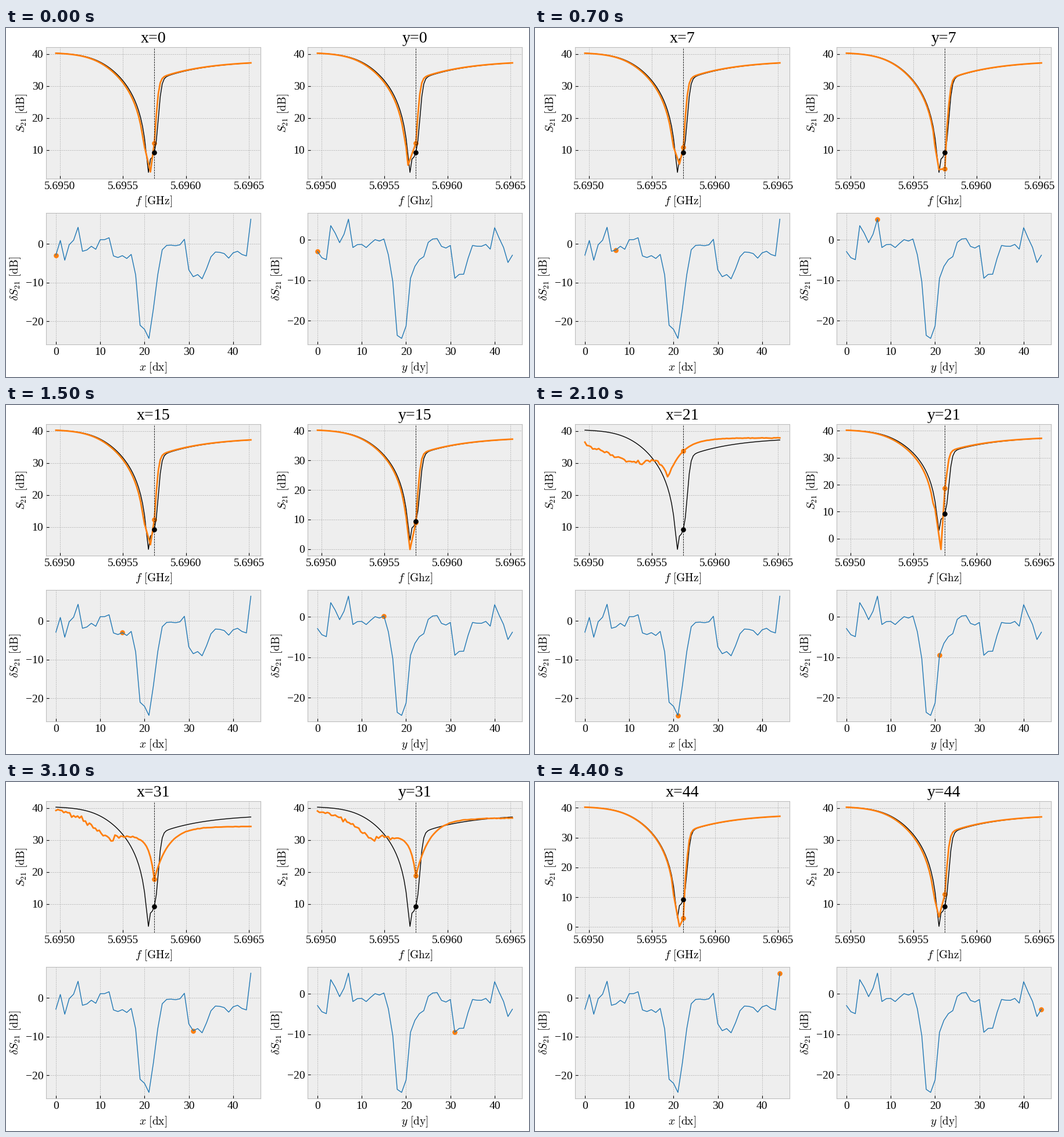
Animation, 900 px wide and 600 px high, one loop 4500 ms. Source, as a matplotlib script:

```python
import numpy as np
import matplotlib.pyplot as plt
from matplotlib.animation import FuncAnimation
from matplotlib.ticker import MultipleLocator

W, H, DPI = 900, 600, 100
STEPS = 45
N, MID, NOTCH = 100, 50, 47
ORANGE, BLUE = "#ff7f0e", "#1f77b4"

plt.rcParams.update({
    "font.family": "Liberation Serif", "font.size": 14,
    "mathtext.fontset": "cm",
    "axes.facecolor": "#eeeeee", "axes.edgecolor": "#bcbcbc",
    "axes.titlesize": 20.16, "axes.labelsize": 14,
    "axes.grid": True, "axes.axisbelow": True,
    "grid.color": "#b2b2b2", "grid.linestyle": "--", "grid.linewidth": 0.5,
    "xtick.direction": "in", "ytick.direction": "in", "xtick.major.pad": 4,
    "toolbar": "None",
})

# Turning points (step, dB) of the change in S21 along each axis
TURNS_X = [(0, -2.9), (1, 0.9), (2, -4.2), (5, 4.3), (6, -1.9), (12, 1.6),
           (13, -3.1), (17, -2.7), (18, -8), (19, -21), (21, -24.4),
           (24, -1.5), (29, 1.2), (30, -6.7), (33, -9), (36, -2.1),
           (43, -3.1), (44, 6.4)]
TURNS_Y = [(0, -2.9), (2, -4.9), (3, 3.5), (5, -0.7), (7, 5.1), (8, -1.9),
           (15, 0.2), (16, -3.7), (17, -10.3), (18, -23.6), (19, -24.35),
           (20, -21.3), (21, -9.5), (26, 0.2), (30, -1.4), (31, -9.5),
           (33, -8.5), (35, -1.4), (39, -2.3), (40, 3), (43, -5.6), (44, -3.8)]

# Depth of the notch (step, dB) while the bead barely disturbs it
LOWS_X = [(0, 3.2), (7, 5.6), (15, 4.5), (37, 8.3), (41, 4), (44, 0.2)]
LOWS_Y = [(0, 5.3), (7, 3.9), (15, -0.1), (21, -4), (30, 5), (37, 2.7), (44, 6)]

idx = np.arange(N)
freq = np.linspace(5.694969, 5.696515, N)


def along(points, x):
    return np.interp(x, *zip(*points))


def trace(turns, seed):
    """Bead response: lines between the turning points with some scatter."""
    steps = np.arange(STEPS)
    noise = np.random.default_rng(seed).uniform(-1.3, 1.3, STEPS)
    noise[[step for step, _ in turns]] = 0
    return along(turns, steps) + noise


def notch(i):
    """Undisturbed resonance: logarithmic fall, then a steep step up."""
    u = i - NOTCH
    fall = 40.5 - 1.98 * np.log1p((31.7 / np.hypot(u, 0.72)) ** 5)
    plateau = 38 - 5 * np.exp((9 - u) / 24)
    rise = plateau - 24 / (1 + np.exp(1.25 * (u - 5.05)))
    return np.where(u <= 0, fall, rise)


def valley(start, bend, centre, low, tail):
    """Detuned resonance: sloping left flank, shallow dip, slow recovery."""
    flank = start + (29.6 - start) * (idx / 29) ** bend
    shelf = np.where(idx <= 29, flank, 31)
    dip = (31 - low) * np.exp(-np.abs(idx - centre) / 2.7)
    recovery = tail - (tail - low) * np.exp(-(idx - centre) / 7)
    return np.where(idx < centre, shelf - dip, recovery)


rest = notch(idx)


def response(col, step, delta):
    """S21 curve with the bead at the given step of one axis."""
    rng = np.random.default_rng([col, step])
    level = rest[MID] - delta
    jitter = rng.normal(0, 0.3, N) * np.interp(idx, [38, 46, N], [1, 0, 0.25])
    if delta < -15:
        low, tail = 25.3, 37.8
        centre = MID + 7 * np.log((tail - level) / (tail - low))
        curve = valley(36.3, 0.75, centre, low, tail) + jitter
    elif step >= 30 and delta < -6:
        curve = valley(39.2, 1.5, MID, level, (34.2, 36.8)[col]) + jitter
    else:
        move = np.clip(0.95 - 0.07 * delta, 0.4, 1.8)
        curve = notch(idx + move * np.where(idx < NOTCH, 0.7, 1))
        low = min(along((LOWS_X, LOWS_Y)[col], step), level)
        bottom = rng.integers(46, 49)
        span = np.arange(45, MID)
        curve[span] = np.interp(span, [45, bottom, MID], [11, low, level])
    curve[MID] = level
    return curve


def dot(ax, x, y, color, **kw):
    return ax.plot([x], [y], "o", ms=5.2, color=color, **kw)[0]


fig = plt.figure(figsize=(W / DPI, H / DPI), dpi=DPI, facecolor="white")


def panel(left, top, xlabel, ylabel):
    w, h = 369, 225.5
    ax = fig.add_axes([left / W, 1 - (top + h) / H, w / W, h / H])
    ax.set_xlabel(xlabel)
    ax.set_ylabel(ylabel)
    ax.yaxis.set_major_locator(MultipleLocator(10))
    return ax


def fit(lo, hi):
    pad = 0.05 * (hi - lo)
    return lo - pad, hi + pad


class Column:
    def __init__(self, col, left, name, unit, shifts):
        self.col, self.name, self.shifts = col, name, shifts
        top = panel(left, 33, rf"$f\ \mathrm{{[{unit}]}}$",
                    r"$S_{21}\ \mathrm{[dB]}$")
        top.xaxis.set_major_locator(MultipleLocator(0.0005))
        top.xaxis.set_major_formatter("{x:.4f}")
        top.plot(freq, rest, color="black", lw=1)
        self.curve, = top.plot(freq, rest, color=ORANGE, lw=2)
        top.axvline(freq[MID], color="black", ls="--", lw=0.6)
        self.top_dot = dot(top, freq[MID], rest[MID], ORANGE, zorder=1.9)
        dot(top, freq[MID], rest[MID], "black")
        top.set_xlim(*fit(freq[0], freq[-1]))
        self.title = top.set_title(f"{name}=0")
        self.top = top

        low = panel(left, 318.4, rf"${name}\ \mathrm{{[d{name}]}}$",
                    r"$\delta S_{21}\ \mathrm{[dB]}$")
        low.xaxis.set_major_locator(MultipleLocator(10))
        low.plot(range(STEPS), shifts, color=BLUE, lw=1)
        self.low_dot = dot(low, 0, shifts[0], ORANGE, zorder=1.9)
        low.set_xlim(*fit(0, STEPS - 1))
        low.set_ylim(*fit(shifts.min(), shifts.max()))

    def show(self, step):
        delta = self.shifts[step]
        s21 = response(self.col, step, delta)
        self.curve.set_ydata(s21)
        self.top_dot.set_ydata([s21[MID]])
        self.low_dot.set_data([step], [delta])
        self.title.set_text(f"{self.name}={step}")
        self.top.set_ylim(*fit(min(s21.min(), rest.min()),
                               max(s21.max(), rest.max())))


columns = [Column(0, 69.1, "x", "GHz", trace(TURNS_X, 1)),
           Column(1, 519.2, "y", "Ghz", trace(TURNS_Y, 2))]


def draw(step):
    for column in columns:
        column.show(step)
    return []


anim = FuncAnimation(fig, draw, frames=STEPS, interval=100, repeat=True,
                     init_func=lambda: draw(0))
plt.show()
```
